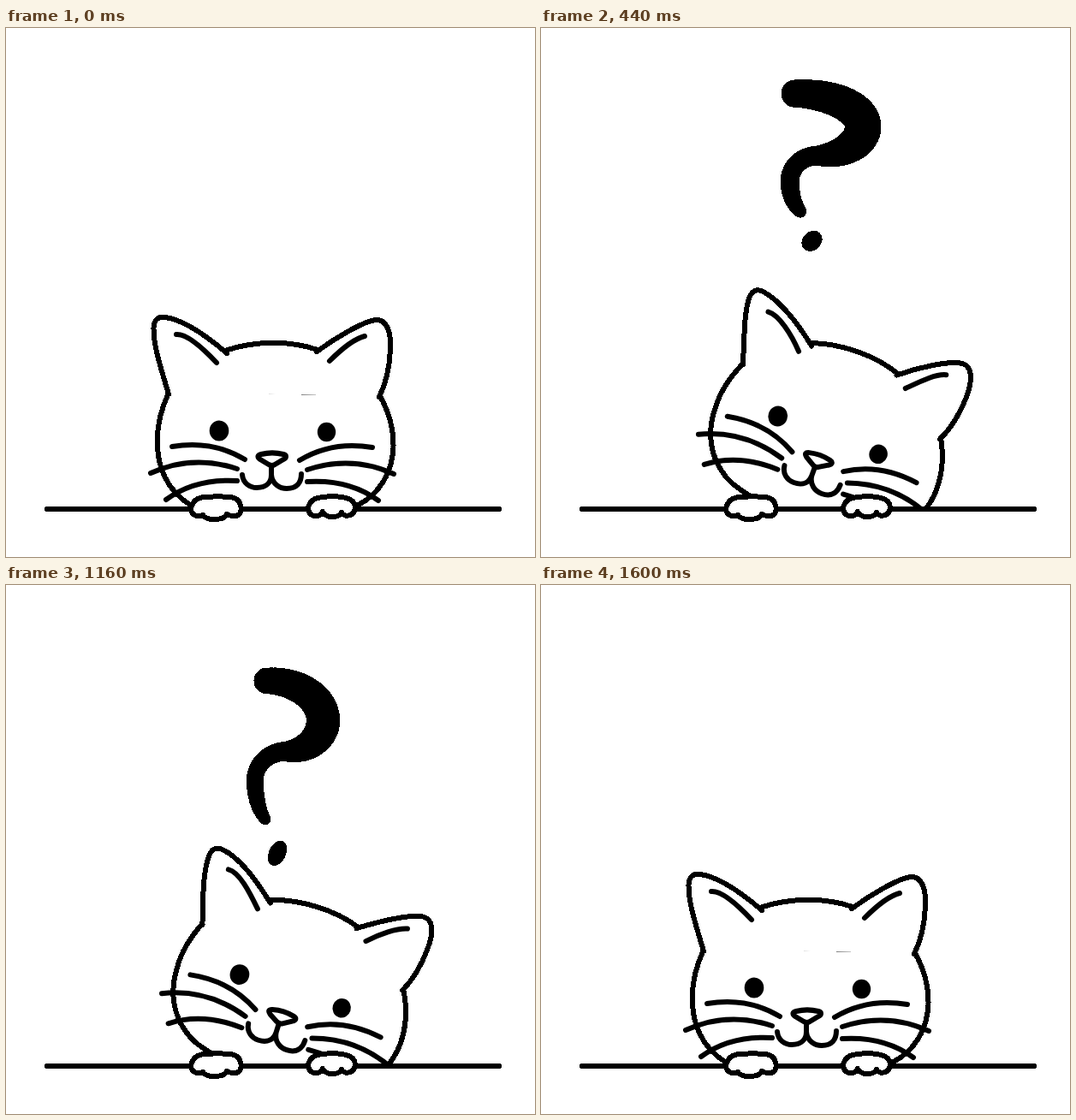
These frames come from a looping animation (618x618 px, 1.92 s). An HTML page:

```html
<!DOCTYPE html>
<html lang="en">
<head>
<meta charset="utf-8">
<title>Curious cat</title>
<style>
html, body { margin: 0; width: 100%; height: 100%; overflow: hidden; background: #fff; }
svg { display: block; width: 100%; height: 100%; }
.ink { fill: none; stroke: #000; stroke-width: 6; stroke-linecap: round; stroke-linejoin: round; }
.body { fill: #fff; }
.solid { fill: #000; stroke: none; }
.crisp { shape-rendering: crispEdges; }
</style>
</head>
<body>
<svg viewBox="0 0 618 618">
  <defs><clipPath id="above"><rect width="618" height="562"/></clipPath></defs>
  <g clip-path="url(#above)">
    <g id="tail" class="ink crisp"></g>
    <ellipse id="dot" class="crisp"/>
    <g id="head" class="ink">
      <path fill="#fff" stroke="none" d="M256 377H364L437 430L190 426Z"/>
      <path class="body crisp" d="M256 377C290 365 333 365 364 376M437 430C447 448 453 468 452.500 490C451 520 436 545 410 558C380 580 250 580 215 557C188 540 177 513 177 485C176 466 181 446 190 426"/>
      <path id="earL" class="body crisp"/>
      <path id="earR" class="body crisp"/>
      <path id="innerL"/>
      <path id="innerR"/>
      <ellipse id="eyeL" class="solid" cx="249" cy="470.500"/>
      <ellipse id="eyeR" class="solid" cx="374.500" cy="472"/>
      <path d="M276 522C277 532 285 537 293 537C304 537 310 531 310 522V512M310 522C311 533 320 538 328 538C340 538 345 531 345 521"/>
      <path class="body" d="M298 498C306 496 316 496 324 498C328 499 328 502 324 504L314 510Q311 512 307 510L297 504C293 501 294 499 298 498Z"/>
      <g id="whiskersL"></g>
      <g id="whiskersR" transform="translate(622 1) scale(-1 1)"></g>
    </g>
  </g>
  <g class="ink crisp">
    <path d="M48 562H576"/>
    <path class="body" d="M230 569C219 573 213 564 218 556C222 547 234 547.500 246 547.500C258 547.500 268 547 272 553C277 561 275 571 266 570Q261 570 258 568C256 573 250 574 243 574C236 574 232 573 230 569Z"/>
    <path class="body" d="M370 565C368 571 359 572 355 567C350 560 356 551 364 549C374 546.500 392 546.500 400 550C409 553 410 563 404 568C400 571 394 570 392 566C390 573 372 573 370 565Z"/>
  </g>
</svg>
<script>
const LOOP = 1920, STEP = 40;
const TURN = 320, SETTLE = 160, BACK = 1120; // tilt time, settle time, start of the return
const TILT = 20, DROOP = 5;
const LINKS = 80, SPINE_END = 3.65;

const $ = id => document.getElementById(id);
const mix = (a, b, k) => a + (b - a) * k;
const clamp = v => Math.max(0, Math.min(1, v));
const set = (el, attrs) => { for (const n in attrs) el.setAttribute(n, attrs[n]); };

function make(parent, tag, attrs = {}) {
  const el = document.createElementNS(parent.namespaceURI, tag);
  set(el, attrs);
  return parent.appendChild(el);
}

const ramp = (t, from, time) => clamp((t - from) / time);
const tent = (t, from, rise, fall) => ramp(t, from, rise) - ramp(t, from + rise, fall);
const mixPose = (a, b, k) => a.map((p, i) => p.map((v, c) => mix(v, b[i][c], k)));

// Each pose: top, right, waist, left and foot of the curve as [x, y, radius], then the dot as [x, y, rx, ry, angle]
const tail = [[319, 218, 15.5], [366, 276, 9.8], [331, 322, 11.5], [293.5, 358, 7], [311, 426, 7], [320, 472, 10, 26, -20]];
const wide = [[287, 77, 19], [389, 104, 16], [312, 141, 11], [293, 161, 11], [312, 181, 10], [318, 214, 13.5, 16.5, 60]];
const mark = [[300, 76.5, 15], [372, 119, 23], [326, 152, 11.5], [290, 185, 11], [317, 233, 1.6], [316, 260.5, 10, 12, 40]];
const hidden = tail.map(([x, y, ...rest]) => [x, y + 200, ...rest]);

function poseAt(t) {
  if (t >= BACK) {
    return mixPose(mixPose(mark, tail, ramp(t, BACK, 160)), hidden, ramp(t, BACK + 160, 160));
  }
  const risen = mixPose(hidden, tail, ramp(t, 0, 160));
  return mixPose(mixPose(risen, wide, ramp(t, 160, 160)), mark, ramp(t, TURN, SETTLE));
}

// Quarter ellipses join the points, leaving them flat and upright by turns
function spinePoint(pose, s) {
  const i = Math.floor(s), u = (s - i) * Math.PI / 2;
  const ease = [Math.sin(u), 1 - Math.cos(u)];
  const kx = ease[i % 2], ky = ease[1 - i % 2];
  const [a, b] = [pose[i], pose[i + 1]];
  return [mix(a[0], b[0], kx), mix(a[1], b[1], ky), mix(a[2], b[2], kx)];
}

const links = Array.from({ length: LINKS }, () => make($("tail"), "path"));

function drawTail(pose) {
  let p = spinePoint(pose, 0);
  links.forEach((el, j) => {
    const q = spinePoint(pose, (j + 1) / LINKS * SPINE_END);
    set(el, { d: `M${p[0]} ${p[1]}L${q[0]} ${q[1]}`, "stroke-width": p[2] + q[2] });
    p = q;
  });
  const [cx, cy, rx, ry, turn] = pose[5];
  set($("dot"), { cx, cy, rx, ry, transform: `rotate(${turn} ${cx} ${cy})` });
}

// Whiskers are mirrored; each one swings about its root
const whiskers = [["279 504", "241 481 194 489"], ["270 515", "218 498 169 520"], ["270 529", "221 526 187 551"]]
  .flatMap(([root, curve]) => [["L", 1], ["R", -1]].map(([side, dir]) =>
    ({ root, dir, el: make($("whiskers" + side), "path", { d: `M${root}Q${curve}` }) })));

// Ear tips trail behind the head while their bases stay on it
function drawEars(lag) {
  const shift = (dx, dy) => (x, y, w = 1) => `${x + dx * w} ${y + dy * w} `;
  const k = Math.abs(lag);
  const l = lag < 0 ? shift(-9 * k, 7 * k) : shift(5 * k, -5 * k);
  const r = lag < 0 ? shift(-7 * k, -8.5 * k) : shift(7 * k, 4 * k);
  set($("earL"), { d: `M190 428C182 400 ${l(172, 372, 0.5)}${l(172.5, 350)}C${l(173, 340)}${l(178, 337)}${l(186, 338)}C${l(208, 341)}${l(236, 361, 0.3)}258 380` });
  set($("earR"), { d: `M363 378C${r(385, 362, 0.6)}${r(418, 342)}${r(433, 341)}C${r(445, 341)}${r(450, 355, 0.7)}${r(449, 376, 0.4)}C${r(448, 397, 0.3)}443 417 436 431` });
  set($("innerL"), { d: `M${l(199, 358)}C${l(212, 357)}231 375 246 391` });
  set($("innerR"), { d: `M378 389C391 376 ${r(407, 363)}${r(419, 360)}` });
}

function draw(t) {
  const tilt = TILT * (ramp(t, 0, TURN) - ramp(t, BACK, TURN));
  const lag = tent(t, BACK, TURN, SETTLE) - tent(t, 0, TURN, SETTLE);
  const blink = tent(t, 640, 160, 160);
  drawTail(poseAt(t));
  drawEars(lag);
  set($("head"), { transform: `rotate(${tilt} 311 540.5)` });
  set($("eyeL"), { rx: mix(11.3, 18.5, blink), ry: mix(12, 3, blink) });
  set($("eyeR"), { rx: mix(10.7, 18.5, blink), ry: mix(11.3, 3, blink) });
  for (const { el, root, dir } of whiskers) set(el, { transform: `rotate(${lag * DROOP * dir} ${root})` });
}

const start = performance.now();
function tick() {
  const t = (performance.now() - start) % LOOP;
  draw(Math.floor(t / STEP) * STEP);
  requestAnimationFrame(tick);
}
tick();
</script>
</body>
</html>
```
